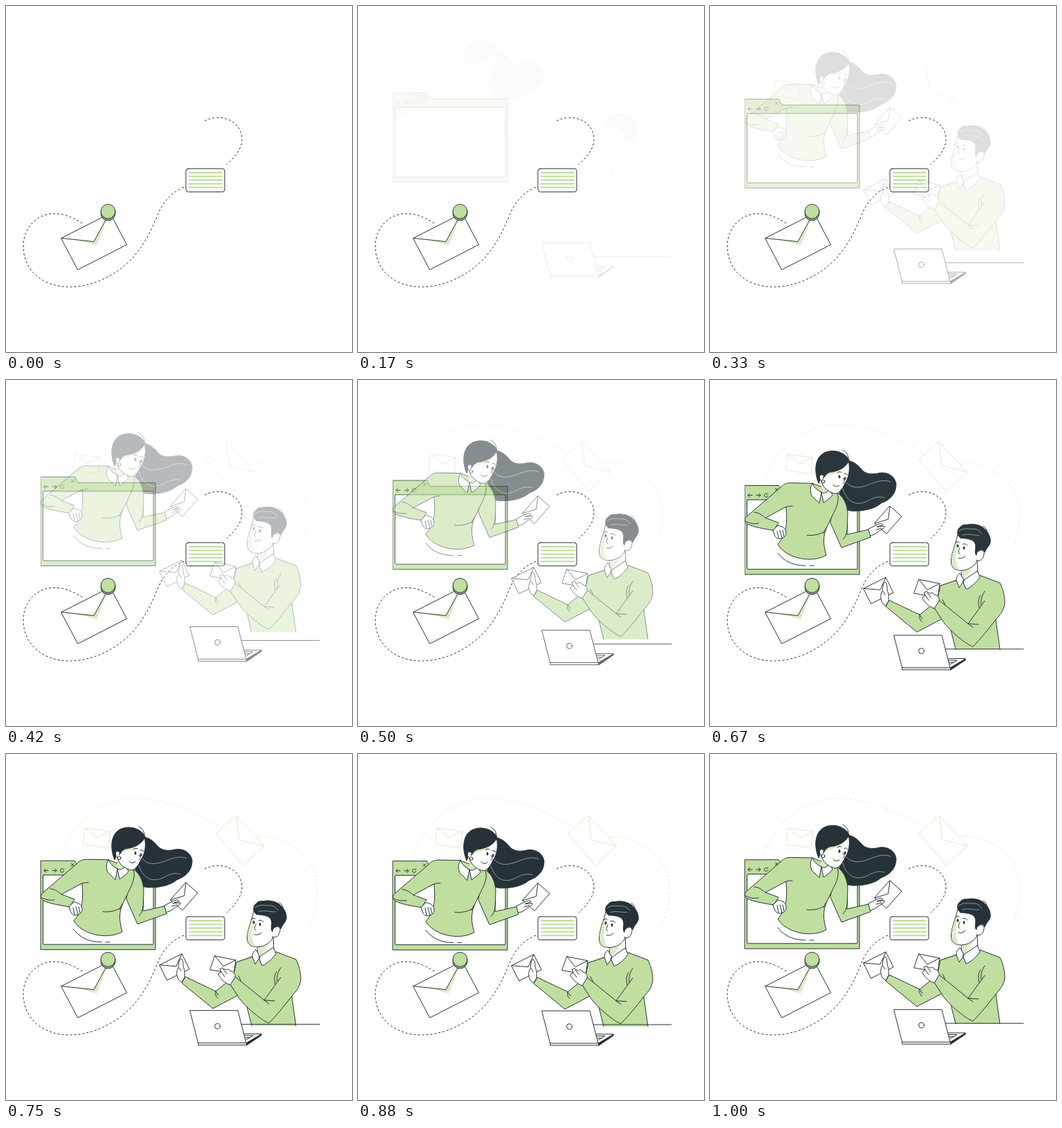
These frames come from a looping animation (500x500 px, 1040 ms). An HTML page:

```html
<!DOCTYPE html>
<html lang="en">
<head>
<meta charset="utf-8">
<title>Sending letters</title>
<style>
html, body { margin: 0; height: 100%; overflow: hidden; background: #fff; }
svg { display: block; width: 100%; height: 100%; fill: none; stroke: #263238; stroke-width: 1; stroke-linejoin: round; stroke-linecap: round; }
.w { fill: #fff; }
.g { fill: #c0de9f; }
.d { fill: #263238; }
.tint { fill: #d9ecc5; stroke: none; }
.pale { stroke: #e1ebcd; }
.dash { stroke-dasharray: 3 3; stroke-linecap: butt; }
.shine { stroke: #aab3b6; stroke-width: .8; }
</style>
</head>
<body>
<svg viewBox="0 0 500 500">
  <!-- Route, sealed letter and card -->
  <path class="dash" d="M287 166C310 154 341 166 341 192C341 207 330 219 319 229M257 262C238 270 227 283 219 302C210 324 200 346 180 367C155 392 122 406 92 406C52 406 25 381 25 347C25 320 45 300 70 300C84 300 98 306 112 315"/>
  <path class="w" d="M80 335.5L150.5 299.5L174.5 345L104 381Z"/>
  <path class="tint" d="M98 337L127 340.5L147 305L131 346Z"/>
  <path d="M80 335.5L127 340.5L149 300"/>
  <circle cx="147.5" cy="299.7" r="10.4" fill="#8ca673"/>
  <circle class="g" cx="147.5" cy="296.9" r="10.4"/>
  <rect class="w" x="260" y="235" width="56" height="33.7" rx="3.5"/>
  <path d="M264 241H313M264 246.3H313M264 251.6H313M264 257H313M264 262.3H313" stroke="#c0de9f" stroke-width="2.1" stroke-linecap="butt"/>

  <g id="back" class="pale">
    <path class="dash" d="M77 147C95 95 145 60 195 64C245 68 275 90 308 103M362 119C400 117 449 145 448 195C448 215 444 230 437 247"/>
    <path class="w" d="M331 89L372 133L341 161L302 115Z"/>
    <path d="M331 89L335.5 124L372 133"/>
    <path class="w" d="M113 107L149 112L146 136L110 130Z"/>
    <path d="M113 107L130 121L149 112"/>
  </g>

  <g id="browser">
    <path class="g" d="M50.5 152.8H99.5L104 161.3H216V281.3H50.5Z"/>
    <rect class="w" x="53.5" y="173.5" width="159.5" height="100.3" rx="1"/>
    <path d="M61 167H55M57.5 164.5L55 167L57.5 169.5M67 167H73M70.5 164.5L73 167L70.5 169.5M83.5 167.5A2.5 2.5 0 1 1 82.5 165L84 164.5M94.5 157L98 160.5M98 157L94.5 160.5"/>
  </g>

  <g id="woman">
    <path class="d" d="M196 117C207 117 214 124 219 130C225 137 233 137 241 136C253 132 267 138 269 151C269 166 260 174 247 179C239 186 225 190 210 190C198 191 188 186 186 172Z"/>
    <path class="shine" d="M193 142C202 163 222 155 235 150C245 146 254 145 261 148M192 158C198 178 212 183 227 176C236 171 244 168 252 171"/>
    <path class="w" d="M260 183L277 198L255 223L238 208Z"/>
    <path d="M260 183L257.5 202L238 208"/>
    <path class="w" d="M229 216L239 211C245 208 249 207 250 210L241 213L252 212C254 215 246 217 243 220C239 224 235 225 231 226Z"/>
    <path d="M240 217L248 215"/>
    <path class="g" d="M183 163C192 168 198 179 199 193L198 224L229 217L232 228L190 243L174 207Z"/>
    <path class="g" d="M147 150L118 149.5C110 149 106 152 102 156L53 198C49 202 50 206 54 209C62 213 78 216 92 218L99 207L80 200L110 184C111 202 113 222 98 238C108 257 145 267 168 254C163 237 163 225 170 211L182 186C185 177 187 170 183 163L174 160Z"/>
    <path d="M64 192C70 192 75 196 80 200M109 185C112 183 115 183 119 183M140 225C150 226 158 224 165 220M164 222L168 214M52 205C57 208 63 209 70 208M192 231C196 228 198 222 199 211M98 251C108 264 122 269 138 269M144 269H150"/>
    <path class="w" d="M91 218L98 211C105 212 110 215 110 222C110 227 106 229 102 230C96 231 94 228 91 218Z"/>
    <path d="M97 219L99 229M101 218L104 229M105 218L107 227"/>
    <path class="w" d="M162 143L160 166L165 177L176 163L188 160L175 133Z" stroke="none"/>
    <path class="tint" d="M162 146C163 155 169 160 177 164L164 176L160 163Z"/>
    <path class="w" d="M148 150C144 156 145 163 147 168L158 179L161 163C155 160 150 156 148 150ZM161 163L164 178C168 176 174 171 177 167L173 159C169 163 165 166 161 163Z"/>
    <path class="w" d="M164 138L175 120L200 117C203 129 201 141 195 150C191 159 186 165 181 165C172 163 163 157 161 147Z"/>
    <path class="tint" d="M164 143C172 135 188 140 200 119L190 120L168 128Z"/>
    <path class="d" d="M157 150C150 134 151 113 165 106C179 99 197 106 201 117C197 127 185 133 173 134C168 136 166 139 164 143L160 143Z"/>
    <path class="w" d="M164 139C158 134 156 144 162 148"/>
    <circle cx="163.5" cy="147.5" r="2.4"/>
    <path d="M192 102C197 105 200 109 200 115M184 135Q187 132 190 134M194 136Q197 135 199 138M192 143C195 147 195 149 192 150M178 152Q181 157 187 153"/>
    <ellipse class="d" cx="187" cy="140.5" rx=".9" ry="2.2"/>
    <ellipse class="d" cx="195" cy="143" rx=".9" ry="2.2"/>
  </g>

  <g id="man">
    <path class="w" d="M222 302L254 286L265 308L233 324Z"/>
    <path d="M222 302L246 304L254 286"/>
    <path class="g" d="M357 290L333 298L328 320L303 340L259 319L254 328L299 365L337 345Z"/>
    <path class="g" d="M357 288L333 298L333 330L348 360L355 390H419L413 347L419 294L390 283Z" stroke="none"/>
    <path d="M357 290L333 298M347 358L355 390M413 347L419 390M336 318C338 322 340 326 341 330M303 340C302 344 303 347 306 350M303 340L307 346"/>
    <path class="w" d="M249 323C246 317 246 311 249 306C250 299 250 294 253 293C257 295 255 302 257 307C259 312 258 317 258 320L254 327Z"/>
    <path d="M250 306L253 311"/>
    <path class="w" d="M302 289L332 295L329 315L295 309Z"/>
    <path d="M302 289L314 304L332 295"/>
    <path class="g" d="M390 283L419 294C424 304 426 314 426 323C425 334 419 340 413 347C403 360 391 375 380 386C372 384 347 364 337 350L324 330L331 319L373 353L397 320"/>
    <path d="M373 353L388 354M373 353L380 358M389 330C387 321 388 316 391 312M392 326C391 318 393 312 397 306"/>
    <path class="w" d="M307 315L311 312L309 308L313 306C317 310 319 309 321 308L325 311C330 313 332 316 331 320L324 331C316 328 311 323 308 318Z"/>
    <path d="M311 312L316 319M314 308L319 315"/>
    <path class="w" d="M363 270L364 291L371 302L387 282L386 258Z"/>
    <path class="tint" d="M363.5 276C371 277 379 274 383 267L371 284L364 290Z"/>
    <path class="w" d="M361 280C357 283 356 287 356 290L360 301L367 291ZM386 277L365 291L370 303C377 301 385 293 390 286Z"/>
    <path class="w" d="M358 224C355 238 349 250 348.5 262C348 272 354 276 363 276C374 276 383 269 386 262L389 237L374 225Z"/>
    <path class="tint" d="M357 231C354 242 349 252 349 262C349 271 354 275 361 275.5C353 266 354 250 358 242Z"/>
    <path class="d" d="M362 229C357 226 356 217 361 214C363 211 367 209 371 210C378 208 391 209 398 217C404 223 406 231 405 236C403 242 399 244 397 250L394 246C390 245 387 249 387 254L384 253C382 247 386 241 382 235C378 230 370 230 362 229Z"/>
    <path class="shine" d="M360 219C368 213 376 217 383 216C388 217 391 220 393 223M365 225C373 222 382 226 389 225"/>
    <path class="w" d="M386 250C390 245 397 246 396 252C395 260 390 264 385 261"/>
    <path d="M395 212C399 214 401 218 400 223M355 236Q357 233 360 235M365 238Q369 236 372 240M361 243C359 248 358 251 361 252M359 258Q365 260 369 255"/>
    <ellipse class="d" cx="358" cy="240.5" rx=".9" ry="2.1"/>
    <ellipse class="d" cx="367" cy="243.5" rx=".9" ry="2.1"/>
  </g>

  <g id="desk">
    <path d="M340 389.2H453"/>
    <path class="w" d="M278 416L343 403H369V405L348 419.2H278Z"/>
    <path class="d" d="M347.5 416L369 403.3V405L348 419.2Z"/>
    <path d="M344 405.5H357L347 411.5M345 408.5H352"/>
    <path class="w" d="M266 369.3H335L347 416.2H278Z"/>
    <circle cx="305.5" cy="392" r="3.9"/>
  </g>
</svg>
<script>
const LOOP = 1040, FPS = 24, FIRST = 4, SLIDE = 30;
const el = id => document.getElementById(id);

// One coordinate of a cubic curve from 0 to 1
const cubic = (s, a, b) => 3 * (1 - s) ** 2 * s * a + 3 * (1 - s) * s * s * b + s ** 3;

// Ease with a slight overshoot
function ease(t) {
  let lo = 0, hi = 1;
  for (let i = 0; i < 30; i++) {
    const mid = (lo + hi) / 2;
    if (cubic(mid, 0.36, 0.5) < t) lo = mid; else hi = mid;
  }
  return cubic(hi, -0.01, 1.38);
}

function place(id, dx, dy, alpha) {
  el(id).setAttribute("transform", `translate(${dx} ${dy})`);
  el(id).setAttribute("opacity", alpha);
}

function draw(ms) {
  const step = Math.floor((ms % LOOP + 3.4) * FPS / 1000);
  const y = ease(Math.min(step / FPS, 1));
  const shift = SLIDE * (y - 1);
  const alpha = step < FIRST ? 0 : Math.min(y, 1);
  place("back", shift, 0, alpha);
  for (const id of ["browser", "desk"]) place(id, 0, shift, alpha);
  // People slide and fade twice: with the scene and on their own
  for (const id of ["woman", "man"]) place(id, 0, 2 * shift, alpha * alpha);
}

const start = performance.now();
function tick() {
  draw(performance.now() - start);
  requestAnimationFrame(tick);
}
tick();
</script>
</body>
</html>
```
